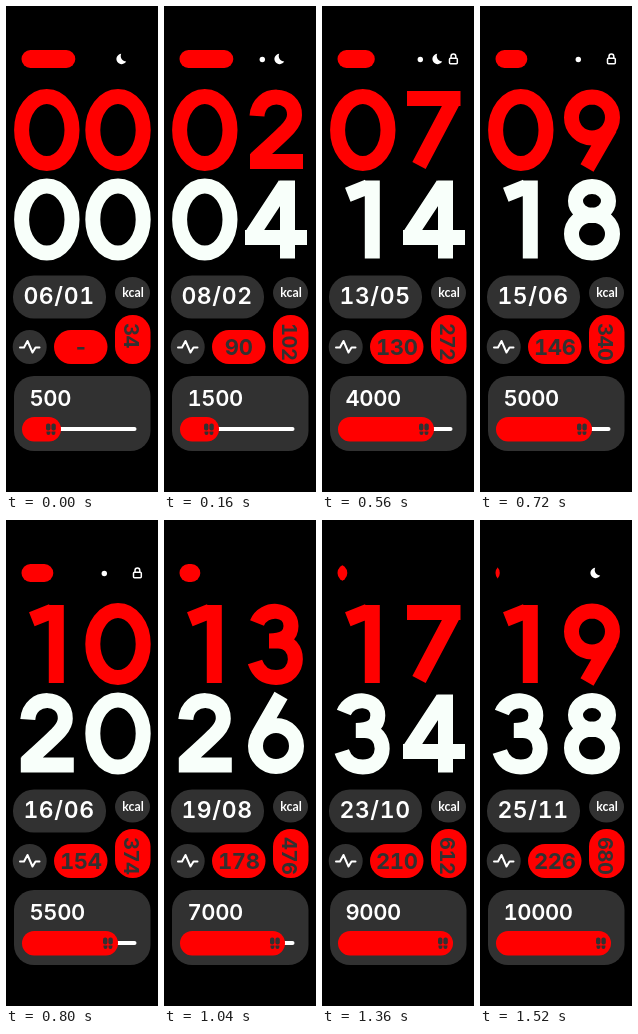
Animation, 152 px wide and 486 px high, one loop 1.6 s. Source, as an HTML page:

```html
<!DOCTYPE html>
<html lang="en">
<head>
<meta charset="utf-8">
<title>Watch face</title>
<style>
  html, body { margin: 0; width: 100%; height: 100%; overflow: hidden; background: #000; }
  svg { display: block; width: 152px; height: 486px; }
  text { font: 600 22px Inter, sans-serif; font-variant-numeric: tabular-nums; fill: #fff; }
  .panel { fill: #313131; }
  text.dark { fill: #313131; font-weight: 700; }
  .red { fill: #f00; }
  .big { fill: none; stroke-width: 15; }
  .line { fill: none; stroke: #fff; stroke-width: 2; stroke-linejoin: round; stroke-linecap: round; }
</style>
</head>
<body>
<svg viewBox="0 0 152 486">
  <clipPath id="cap"><rect x="15.5" y="44" width="100" height="18" rx="9"/></clipPath>
  <g clip-path="url(#cap)">
    <rect id="battery" class="red" y="44" width="100" height="18" rx="9"/>
  </g>
  <circle id="dot" cx="98.3" cy="53.5" r="2.7" fill="#fff"/>
  <path id="moon" d="M115.2 47.8a5.2 5.2 0 1 0 5 7.6a5.4 5.4 0 0 1-5-7.6z" fill="#fff"/>
  <g id="lock" class="line" style="stroke-width:1.5">
    <rect x="127.5" y="52.3" width="7.8" height="5.4" rx="1"/>
    <path d="M129 52V50.5a2.4 2.4 0 0 1 4.8 0V52"/>
  </g>

  <g class="big" stroke="#f00">
    <path id="h0" transform="translate(40.8 83)"/>
    <path id="h1" transform="translate(112 83)"/>
  </g>
  <g class="big" stroke="#f8fffa">
    <path id="m0" transform="translate(40.8 172.5)"/>
    <path id="m1" transform="translate(112 172.5)"/>
  </g>

  <rect class="panel" x="7" y="269.5" width="93" height="43" rx="21"/>
  <text id="date" x="53" y="298.3" text-anchor="middle" style="font-size:23px;letter-spacing:.6px"></text>
  <rect class="panel" x="109" y="271" width="35" height="31.5" rx="17.5" ry="15.75"/>
  <text x="127" y="291" text-anchor="middle" style="font:700 12.3px Lato,sans-serif">kcal</text>

  <circle class="panel" cx="23.7" cy="341" r="17"/>
  <path class="line" d="M14 341.5h4l3.5-6.5 5 11.5 3-5h4"/>
  <rect class="red" x="48" y="324" width="53.5" height="34" rx="17"/>
  <text id="pulse" class="dark" x="74.8" y="349" text-anchor="middle" style="letter-spacing:-.3px"></text>
  <rect class="red" x="109" y="309" width="35.5" height="49" rx="17.5"/>
  <text id="energy" class="dark" transform="translate(118 317) rotate(90)" style="font-size:20px;letter-spacing:-.4px"></text>

  <rect class="panel" x="8" y="370" width="136.5" height="75" rx="20"/>
  <text id="steps" x="23.5" y="400" style="letter-spacing:-.4px"></text>
  <rect x="20" y="421" width="110.5" height="4" rx="2" fill="#fff"/>
  <rect id="bar" class="red" x="16" y="411" height="24.5" rx="12.2"/>
  <g id="feet" class="panel">
    <rect x="-15" y="417.5" width="4.4" height="7" rx="2"/>
    <rect x="-9.6" y="417.5" width="4.4" height="7" rx="2"/>
    <path d="M-14.5 425.5h3.9v1.5a1.9 1.9 0 0 1-3.9 0zM-9.5 425.5h3.9v1.5a1.9 1.9 0 0 1-3.9 0z"/>
  </g>
</svg>
<script>
const STEP = 80, COUNT = 20;

// Digit centre lines: x is centred on 0, y runs from 0 to 82.
const DIGITS = [
  'M0 7.5A25.2 33.5 0 0 1 0 74.5A25.2 33.5 0 0 1 0 7.5Z',
  'M9.5 2V80M-15 16.2L5 8.3',
  'M-19 27C-17 1 19 3 18.5 26C18.5 36 10 42 -20.5 70M-26 72.5H27',
  'M-19 20C-12 3 15 5 15 23C15 33 8 38 -7 38H2C25 38 26 74.5 0 74.5C-12 74.5 -18 68 -21 59',
  'M11.5 80V2M9.2 6L-23.5 55.6M-31 59H31',
  'M24 9.5H-13L-16 41C-4 29 20.5 31 20.5 53C20.5 79 -13 81 -22 61',
  'M0 33A20.5 20.5 0 0 1 0 74A20.5 20.5 0 0 1 0 33ZM-18 43L5 3',
  'M-27 9.5H26.5M18.5 13L-15 76.5',
  'M0 8A16.5 14.5 0 0 1 0 37A16.5 14.5 0 0 1 0 8ZM0 36.5A20.5 19 0 0 1 0 74.5A20.5 19 0 0 1 0 36.5Z',
  'M0 8A20.5 20.5 0 0 1 0 49A20.5 20.5 0 0 1 0 8ZM18 39L-5 79'
];
const BAR_WIDTHS = [39, 58, 96, 105, 115];

const $ = id => document.getElementById(id);
const pad = n => String(n).padStart(2, '0');
const write = (id, value) => { $(id).textContent = value; };
const show = (id, on) => $(id).setAttribute('visibility', on ? 'visible' : 'hidden');

function drawPair(id, value) {
  [...pad(value)].forEach((digit, i) => $(id + i).setAttribute('d', DIGITS[digit]));
}

function draw(hour) {
  drawPair('h', hour);
  drawPair('m', hour * 2);
  write('date', pad(6 + hour) + '/' + pad(1 + Math.ceil(hour / 2)));
  write('pulse', hour ? 74 + 8 * hour : '-');
  write('energy', 34 * (hour + 1));

  const steps = 500 * (hour + 1);
  const width = BAR_WIDTHS[Math.min(4, Math.floor(steps / 2000))];
  write('steps', steps);
  $('bar').setAttribute('width', width);
  $('feet').setAttribute('transform', `translate(${16 + width} 0)`);

  // The charge pill slides under a fixed left cap, so low levels become a lens.
  const charge = Math.min(10, Math.floor((100 - 5 * hour) / 10) + 1);
  $('battery').setAttribute('x', 5.5 * charge - 85.7);

  show('dot', hour >= 1 && hour < 13);
  show('moon', hour < 9 || hour >= 18);
  show('lock', hour >= 4 && hour < 13);
}

let shown = -1;
function tick() {
  const hour = Math.floor(performance.now() / STEP) % COUNT;
  if (hour !== shown) draw(shown = hour);
  requestAnimationFrame(tick);
}
tick();
</script>
</body>
</html>
```
